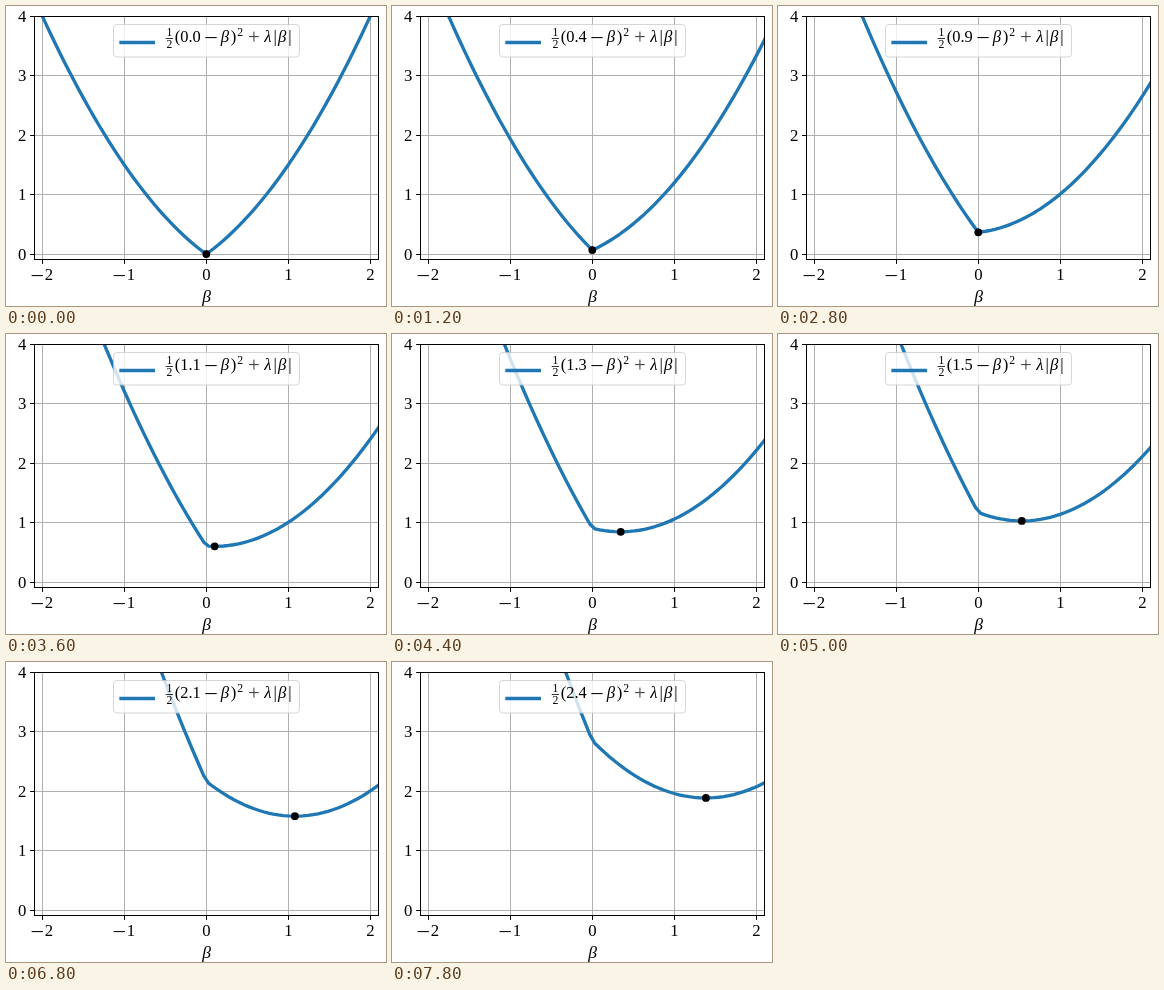
Animation of 380x300 px, one loop 8000 ms. Source, as an HTML page:

```html
<!DOCTYPE html>
<html lang="en">
<head>
<meta charset="utf-8">
<title>Penalised quadratic</title>
<style>
  html, body { margin: 0; width: 100%; height: 100%; overflow: hidden; background: #fff; }
  svg { display: block; }
  text { font: 16.7px "Liberation Serif", "Times New Roman", serif; }
  .grid { stroke: #b0b0b0; }
  .axis { stroke: #000; fill: none; }
  .curve { stroke: #1f77b4; stroke-width: 3.33; fill: none; stroke-linejoin: round; stroke-linecap: square; }
  .mid { text-anchor: middle; }
  .end { text-anchor: end; }
  .greek { font-style: italic; }
  .dash { font-size: 22px; }
  .plus { font-size: 21px; fill-opacity: .75; }
  .small { font-size: 11.7px; }
</style>
</head>
<body>
<svg width="380" height="300" viewBox="0 0 380 300">
  <defs><clipPath id="area"><rect x="28.5" y="10.5" width="344" height="243"/></clipPath></defs>
  <g id="grid" class="grid"></g>
  <g clip-path="url(#area)">
    <path id="curve" class="curve"/>
    <circle id="dot" r="3.9"/>
  </g>
  <g id="ticks"></g>
  <rect class="axis" x="28.5" y="10.5" width="344" height="243"/>
  <text class="greek mid" x="200.5" y="295.5" style="font-size:17.5px">β</text>

  <rect x="107.5" y="18.5" width="186" height="32.5" rx="3.3" fill="#fff" stroke="#ccc" opacity=".8"/>
  <path class="curve" d="M115 36.5H147.3"/>
  <g>
    <text class="small mid" x="163.4" y="29.8">1</text>
    <path class="axis" d="M159.7 32.5H167" stroke-width=".8"/>
    <text class="small mid" x="163.4" y="42.3">2</text>
    <text x="168.8" y="36.3">(</text>
    <text id="value" x="174.3" y="36.3" style="font-size:16.4px">0.0</text>
    <text class="dash" x="199.6" y="37.2">–</text>
    <text class="greek" x="214.7" y="36.3">β</text>
    <text x="224.8" y="36.3">)</text>
    <text class="small" x="231.2" y="30.3">2</text>
    <text class="plus" x="242" y="37.5">+</text>
    <text class="greek" x="258.2" y="36.3">λ</text>
    <text x="267.4" y="36.3">|</text>
    <text class="greek" x="271.9" y="36.3">β</text>
    <text x="282.2" y="36.3">|</text>
  </g>
</svg>
<script>
  const STEP_MS = 200, STEPS = 40, SAMPLES = 100;
  const byId = id => document.getElementById(id);
  const toX = b => 200.3 + 81.9 * b;
  const toY = v => 248.1 - 59.4 * v;
  const snap = p => Math.floor(p) + 0.5;

  let grid = "", ticks = "";
  for (let b = -2; b <= 2; b++) {
    const x = snap(toX(b));
    grid += `<path d="M${x} 10V254"/>`;
    ticks += `<path class="axis" d="M${x} 254v3.9"/>`;
    ticks += b < 0
      ? `<text class="dash" x="${x - 10.8}" y="274.8">–</text><text x="${x + 2.2}" y="274">${-b}</text>`
      : `<text class="mid" x="${x}" y="274">${b}</text>`;
  }
  for (let v = 0; v <= 4; v++) {
    const y = snap(toY(v));
    grid += `<path d="M28 ${y}H373"/>`;
    ticks += `<path class="axis" d="M28 ${y}h-3.9"/><text class="end" x="20.4" y="${y + 5.3}">${v}</text>`;
  }
  byId("grid").innerHTML = grid;
  byId("ticks").innerHTML = ticks;

  const loss = (z, b) => (z - b) ** 2 / 2 + Math.abs(b);

  function draw(step) {
    const z = step * 3 / 49;
    const points = Array.from({ length: SAMPLES }, (_, i) => {
      const b = -3 + 6 * i / (SAMPLES - 1);
      return toX(b).toFixed(2) + " " + toY(loss(z, b)).toFixed(2);
    });
    byId("curve").setAttribute("d", "M" + points.join("L"));
    const best = Math.max(z - 1, 0);
    byId("dot").setAttribute("cx", toX(best));
    byId("dot").setAttribute("cy", toY(loss(z, best)));
    byId("value").textContent = z.toFixed(1);
  }

  const start = performance.now();
  function tick(now) {
    draw(Math.floor(Math.max(0, now - start) / STEP_MS) % STEPS);
    requestAnimationFrame(tick);
  }
  draw(0);
  requestAnimationFrame(tick);
</script>
</body>
</html>
```
